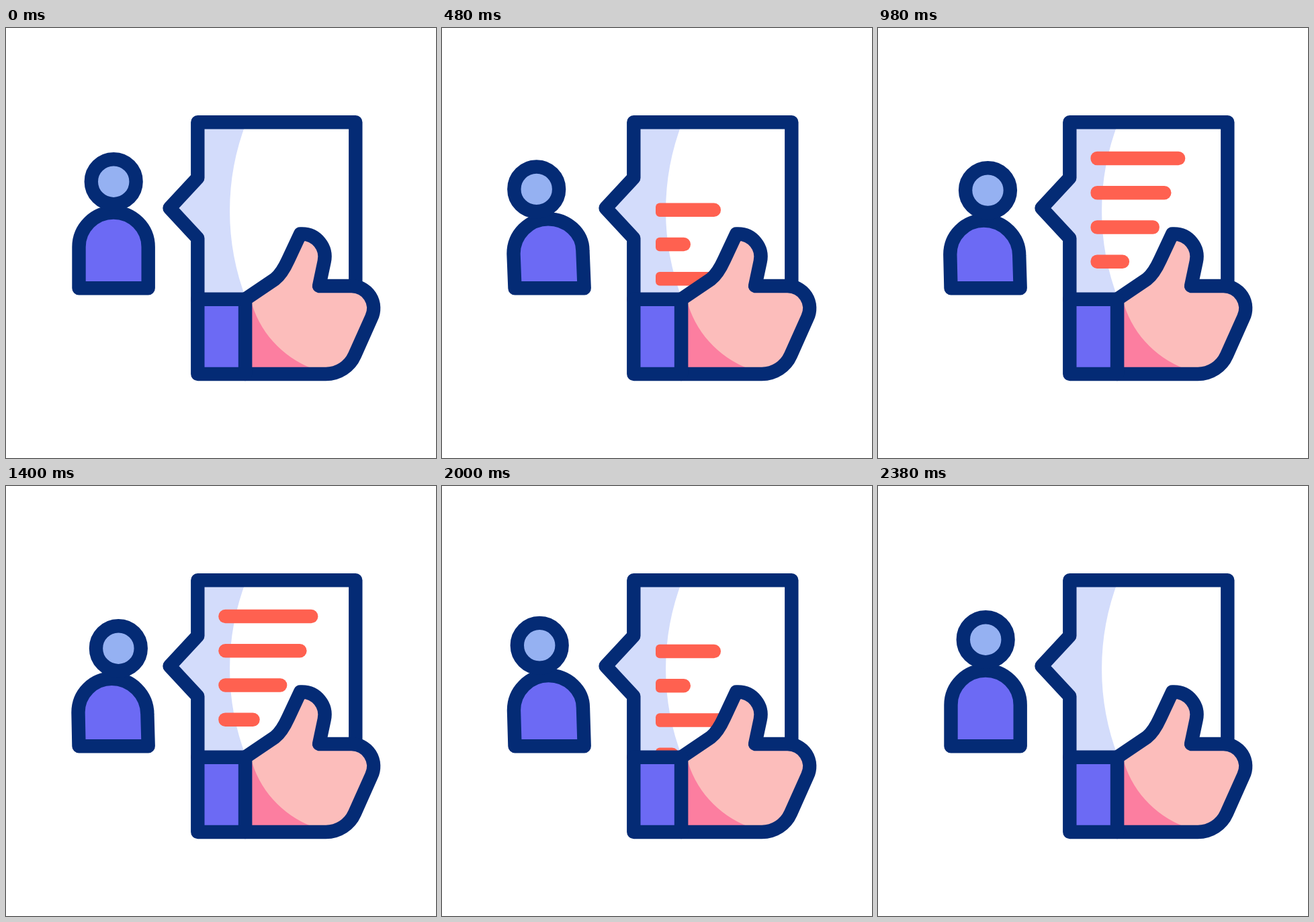
Recreate the animation shown at these times as an HTML page with a canvas. Size 640 px wide and 640 px high, loop 2.4 s.

```html
<!DOCTYPE html>
<html>
<head>
<meta charset="utf-8">
<style>
  html, body { margin: 0; height: 100%; overflow: hidden; background: #fff; }
  canvas { display: block; }
</style>
</head>
<body>
<canvas id="stage" width="640" height="640"></canvas>
<script>
const ctx = document.getElementById('stage').getContext('2d');
const LOOP = 2400, NAVY = '#042b75', VIOLET = '#6c6af4', RED = '#ff6150';

const page = new Path2D('M285.3 404V313L243.5 268L285.3 223V140.3H520.3V384L470 404Z');
const pageShade = new Path2D('M285.3 140.3H357.7A365 365 0 0 0 357.7 404H285.3V313L243.5 268L285.3 223Z');
const hand = new Path2D('M356 403.7L400 374C409 367 415 356 420 345L438 306.5H440.5' +
  'A34 34 0 0 1 473.7 347.6L466 384H514A33 33 0 0 1 544 431L519 487A47 47 0 0 1 476 515H356Z');
const handShade = new Path2D('M356 403.7H364A150 150 0 0 0 456 507V515H356Z');
const cuff = new Path2D('M285.3 403.7H356V515H285.3Z');
const pageEdge = new Path2D('M285.3 404V313L243.5 268L285.3 223V140.3H520.3V384');

// Text rows: right end when short, right end when long, right corner radius when short
const rows = [[415, 465, 10.2], [370, 448.5, 10.2], [421.5, 418.3, 5], [352.5, 378, 10.2]];

// Poses: head x, y, then left shoulder, top and right shoulder of the body
const rest = [160.2, 228.7, 108.5, 326, 160, 274.5, 211.7, 326];
const readLeft = [138.8, 241, 106.3, 337, 157.8, 285.3, 209.2, 332];
const readRight = [167.6, 241.7, 107.5, 337, 157.3, 286.8, 210.4, 340];

const mix = (a, b, k) => a + (b - a) * k;
const mixPose = (a, b, k) => a.map((v, i) => mix(v, b[i], k));

function ease(t, from, to) {
  const u = Math.min(1, Math.max(0, (t - from) / (to - from)));
  return u * u * (3 - 2 * u);
}
const pulse = (t, a, b, c, d) => ease(t, a, b) - ease(t, c, d);

function fill(path, color) {
  ctx.fillStyle = color;
  ctx.fill(path);
}

function shape(path, color) {
  fill(path, color);
  ctx.stroke(path);
}

function drawPerson(t) {
  const reading = mixPose(readLeft, readRight, pulse(t, 600, 1100, 1380, 1760));
  const [hx, hy, lx, ly, tx, ty, rx, ry] =
    mixPose(rest, reading, pulse(t, 0, 590, 1785, 2380));
  const k = 0.552, body = new Path2D(), head = new Path2D();
  body.moveTo(108.5, 387.3);
  body.lineTo(lx, ly);
  body.bezierCurveTo(lx, mix(ly, ty, k), mix(tx, lx, k), ty, tx, ty);
  body.bezierCurveTo(mix(tx, rx, k), ty, rx, mix(ry, ty, k), rx, ry);
  body.lineTo(211.7, 387.3);
  body.closePath();
  head.arc(hx, hy, 33.4, 0, Math.PI * 2);
  shape(body, VIOLET);
  shape(head, '#95b1f2');
}

function drawRows(t) {
  const drop = 220 * (1 - pulse(t, 180, 680, 1826, 2380));
  const grow = pulse(t, 680, 1080, 1380, 1710);
  const left = mix(318, 316.2, grow), leftRadius = mix(6, 10.2, grow);
  ctx.save();
  ctx.beginPath();
  ctx.rect(290, 145, 225, 255);
  ctx.clip();
  ctx.fillStyle = RED;
  rows.forEach(([short, long, radius], i) => {
    const r = mix(radius, 10.2, grow);
    ctx.beginPath();
    ctx.roundRect(left, 183.8 + i * 51.2 + drop, mix(short, long, grow) - left, 20.5,
      [leftRadius, r, r, leftRadius]);
    ctx.fill();
  });
  ctx.restore();
}

function draw() {
  const t = performance.now() % LOOP;
  ctx.fillStyle = '#fff';
  ctx.fillRect(0, 0, 640, 640);
  ctx.strokeStyle = NAVY;
  ctx.lineWidth = 20.4;
  ctx.lineJoin = ctx.lineCap = 'round';

  drawPerson(t);
  fill(page, '#fff');
  fill(pageShade, '#d3dcfb');
  drawRows(t);
  ctx.stroke(pageEdge);
  fill(hand, '#fcbdbb');
  fill(handShade, '#fc7ea0');
  ctx.stroke(hand);
  shape(cuff, VIOLET);
  requestAnimationFrame(draw);
}
draw();
</script>
</body>
</html>
```
